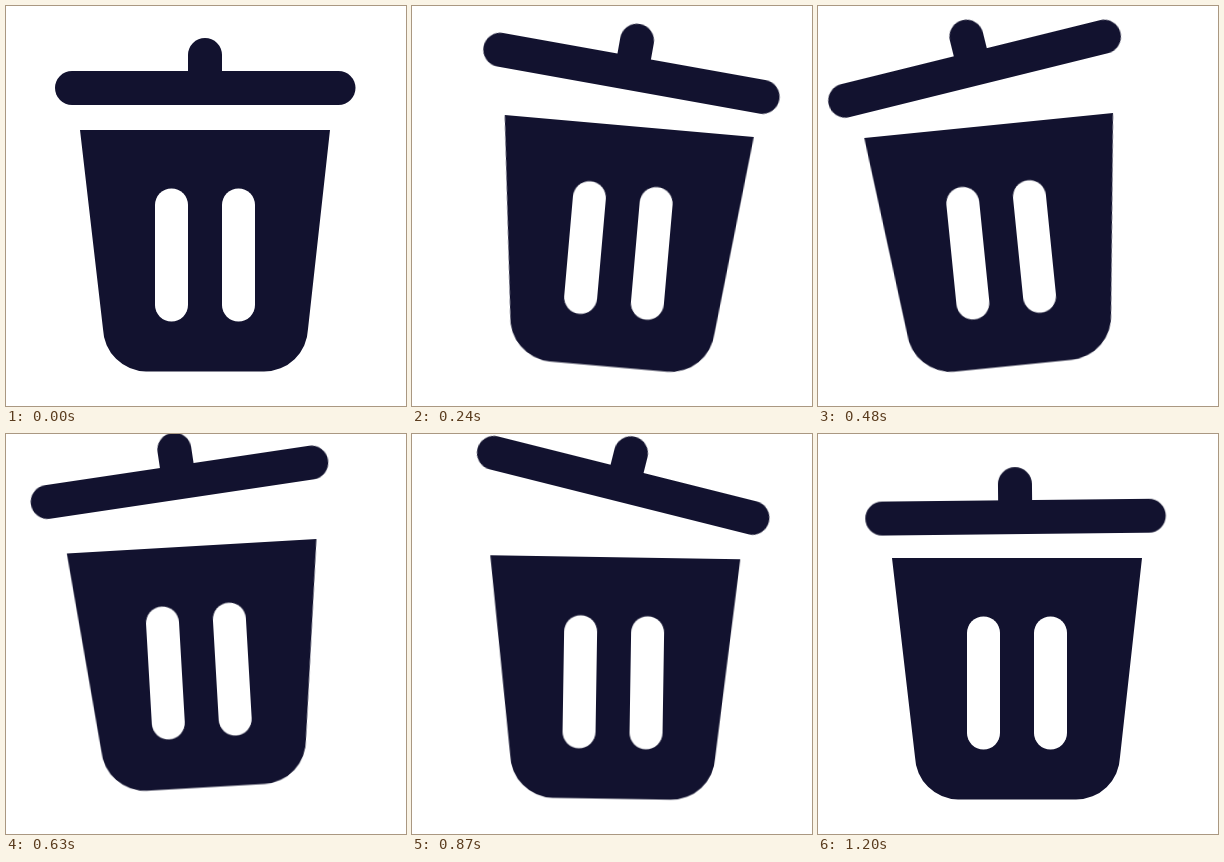
An HTML page without scripts that plays this animation: 400x400 px, repeating every 2.23 s.

```html
<!DOCTYPE html>
<html lang="en">
<head>
<meta charset="utf-8">
<title>Shaking bin</title>
<style>
  html, body { margin: 0; height: 100%; overflow: hidden; background: #fff; }
  svg { display: block; width: 100%; height: 100%; fill: #12122f; }

  .bin { transform-origin: 199px 365.5px; animation: rock 2230ms infinite; }
  .lid { transform-origin: 199px 82px; animation: rattle 2230ms infinite; }
  .slot { fill: #fff; }

  /* The bin rocks on its bottom corners, hops once, then settles. */
  @keyframes rock {
    0%      { transform: translate(0, 0) rotate(0deg); animation-timing-function: ease-in-out; }
    8.97%   { transform: translate(-2.7px, -5.6px) rotate(5.67deg); animation-timing-function: ease-in; }
    15.47%  { transform: translate(-3.4px, 0) rotate(0deg); animation-timing-function: ease-out; }
    22.65%  { transform: translate(-4.15px, -5.95px) rotate(-5.98deg); animation-timing-function: ease-in; }
    24.22%  { transform: translate(-3px, -9px) rotate(-5.5deg); animation-timing-function: linear; }
    28.25%  { transform: translate(.6px, -12.1px) rotate(-3.35deg); animation-timing-function: ease-out; }
    31.39%  { transform: translate(.6px, -13.3px) rotate(-2deg); animation-timing-function: ease-in; }
    39.01%  { transform: translate(.5px, -.7px) rotate(.9deg); animation-timing-function: ease-in; }
    41.7%   { transform: translate(1px, 0) rotate(0deg); animation-timing-function: ease-out; }
    47.09%  { transform: translate(2.7px, -2px) rotate(-2.07deg); animation-timing-function: ease-in-out; }
    53.81%, 100% { transform: translate(0, 0) rotate(0deg); }
  }

  /* The lid does the same on the rim, relative to the bin. */
  @keyframes rattle {
    0%      { transform: translate(0, 0) rotate(0deg); animation-timing-function: ease-in-out; }
    8.97%   { transform: translate(-2.3px, -12.1px) rotate(5.84deg); animation-timing-function: ease-in; }
    15.47%  { transform: translate(-6px, 0) rotate(0deg); animation-timing-function: ease-out; }
    22.65%  { transform: translate(-8.6px, -16.5px) rotate(-8.44deg); animation-timing-function: ease-in; }
    24.22%  { transform: translate(-8.8px, -21px) rotate(-8deg); animation-timing-function: linear; }
    28.25%  { transform: translate(-8.7px, -22.5px) rotate(-5.25deg); animation-timing-function: linear; }
    31.39%  { transform: translate(-5.5px, -25px) rotate(-.5deg); animation-timing-function: ease-out; }
    39.01%  { transform: translate(6.5px, -30.1px) rotate(13.2deg); animation-timing-function: ease-in-out; }
    47.09%  { transform: translate(-2.2px, -2.8px) rotate(1.2deg); animation-timing-function: ease-in-out; }
    53.81%, 100% { transform: translate(-1.7px, 1.2px) rotate(-.6deg); }
  }
</style>
</head>
<body>
<svg viewBox="0 0 400 400">
  <g class="bin">
    <path d="M74 124H324L302 323A44 44 0 0 1 258 365.5H140A44 44 0 0 1 97 323Z"/>
    <g class="slot">
      <rect x="149" y="182.5" width="33" height="133" rx="16.5"/>
      <rect x="216" y="182.5" width="33" height="133" rx="16.5"/>
    </g>
    <g class="lid">
      <rect x="182" y="32" width="34" height="60" rx="17"/>
      <rect x="49" y="65" width="300.5" height="34" rx="17"/>
    </g>
  </g>
</svg>
</body>
</html>
```
